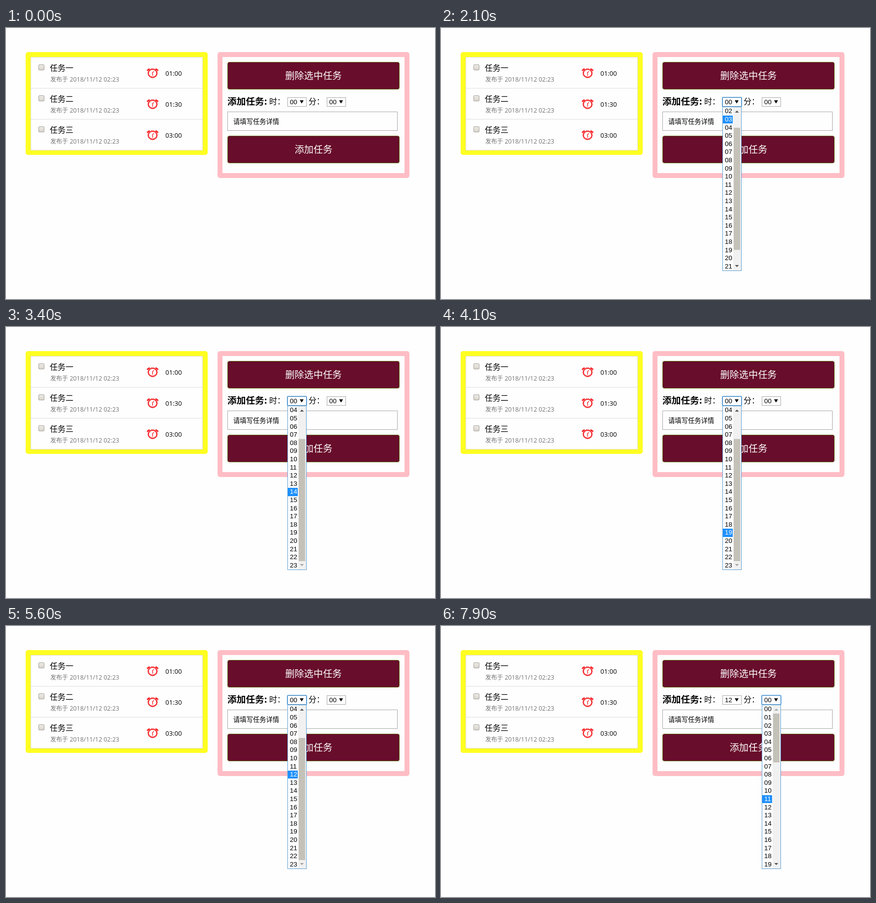
An HTML page that plays this animation: 872x551 px, repeating every 8 s.

```html
<!DOCTYPE html>
<html lang="zh-CN">
<head>
<meta charset="utf-8">
<title>任务列表</title>
<style>
html, body { margin: 0; width: 100%; height: 100%; overflow: hidden; background: #fefefe; }
svg { display: block; width: 872px; height: 551px; }
text { font-family: "Noto Sans CJK SC", "Noto Sans CJK", sans-serif; white-space: pre; }
.num { font-family: "Open Sans", "Noto Sans", sans-serif; }
.opt { font-family: "Liberation Sans", Arial, sans-serif; }
</style>
</head>
<body>
<svg viewBox="0 0 872 551" xmlns="http://www.w3.org/2000/svg">
  <defs>
    <linearGradient id="box" x2="0" y2="1">
      <stop stop-color="#eeebe6"/><stop offset="1" stop-color="#d8d4cc"/>
    </linearGradient>
  </defs>
  <g id="page"></g>
  <g id="live"></g>
</svg>
<script>
const LOOP = 8000, ROWS = 20, ROW_H = 16.6, TOP = 161;
const page = document.getElementById('page'), live = document.getElementById('live');

const rect = (x, y, w, h, fill, more = '') =>
  `<rect x="${x}" y="${y}" width="${w}" height="${h}" fill="${fill}" ${more}/>`;
const text = (x, y, size, str, more = '') =>
  `<text x="${x}" y="${y}" font-size="${size}" ${more}>${str}</text>`;
const path = (d, more = '') => `<path d="${d}" ${more}/>`;

const panel = (x, y, w, h, color) =>
  rect(x, y, w, h, color, 'rx="5"') + rect(x + 10, y + 10, w - 20, h - 20, '#fefefe');

const button = (y, label) =>
  rect(450.5, y + .5, 349, 55, '#680d2b', 'rx="3.5" stroke="#66751c"') +
  text(625, y + 35, 19.2, label, 'fill="#fff" text-anchor="middle"');

const clock = (x, y) => `<g transform="translate(${x} ${y})" fill="none" stroke="#f5262a">
  <ellipse rx="8.6" ry="8.2" stroke-width="2.2"/>
  <circle r="9.9" stroke-width=".8" stroke-dasharray="2 1.6"/>
  <path d="M-10.5-6L-7-8.5M10.5-6L7-8.5" stroke-width="2.8" stroke-linecap="round"/>
  <path d="M0 5V0M-1 0L2.5-4" stroke-width="1.4"/></g>`;

const task = ([name, time], i) => {
  const y = 59 + 63 * i;
  return rect(66.5, y + 15.5, 11, 11, 'url(#box)', 'rx="1.5" stroke="#a5a29c"') +
    text(89, y + 28, 16, name) +
    text(90, y + 49.5, 12, '发布于', 'fill="#757575"') +
    text(129.5, y + 49.5, 12.4, '2018/11/12 02:23', 'class="num" fill="#757575"') +
    clock(298, y + 33) +
    text(324, y + 38, 13.1, time, 'class="num"') +
    path(`M50 ${y + 63.5}H400`, 'stroke="#ddd"');
};

page.innerHTML =
  panel(40, 49, 370, 209, '#ffff22') +
  rect(50.5, 59.5, 349, 189, '#fefefe', 'stroke="#ddd"') +
  [['任务一', '01:00'], ['任务二', '01:30'], ['任务三', '03:00']].map(task).join('') +
  panel(430, 49, 390, 256, '#ffbdc5') +
  button(69, '删除选中任务') +
  text(450, 155.5, 18.72, '添加任务:', 'font-weight="bold"') +
  text(535, 155, 16, '时：') + text(615, 155, 16, '分：') +
  rect(450.5, 170.5, 345, 38, '#fefefe', 'stroke="#a9a9a9"') +
  text(462, 195, 13.33, '请填写任务详情') +
  button(219, '添加任务');

const two = n => String(n).padStart(2, '0');

function select(x, value, focus, hover) {
  return rect(x + .5, 141.5, 38, 18, '#fefefe', `stroke="${hover ? '#7a7a7a' : '#a9a9a9'}"`) +
    text(x + 5, 155, 13.33, two(value), 'class="opt"') +
    path(`M${x + 25} 147h8l-4 6.5z`) +
    (focus ? rect(x, 141, 39, 19, 'none', 'rx="1.5" stroke="#4a98dc" stroke-width="1.7"') : '');
}

function popup(x, count, pick, scroll, hot) {
  let out = rect(x + .5, 160.5, 38, 333, '#fefefe', 'stroke="#5a9fd4"');
  for (let i = 0; i < ROWS; i++) {
    const n = i + scroll, y = Math.round(TOP + i * ROW_H), on = n === pick;
    if (on) out += rect(x + 1, y, 20, Math.round(TOP + (i + 1) * ROW_H) - y, '#1e90ff');
    out += text(x + 5, Math.round(173.3 + i * ROW_H), 13.33, two(n), `class="opt" fill="${on ? '#fff' : '#000'}"`);
  }
  const arrow = ok => `fill="${ok ? '#505050' : '#a3a3a3'}"`;
  return out + rect(x + 22, 161, 16, 332, '#f1f1f1') +
    rect(x + 23, 178 + 298 * scroll / count, 13, 298 * ROWS / count, hot ? '#a8a8a8' : '#c4c1b9') +
    path(`M${x + 25.5} 172l4-4 4 4z`, arrow(scroll > 0)) +
    path(`M${x + 25.5} 482l4 4 4-4z`, arrow(scroll < count - ROWS));
}

// Each entry changes part of the state from its time on.
const events = [
  [0, { hour: 0, focus: '', open: '', hover: '', pick: 0, scroll: 0, hot: false }],
  [500, { hover: 'h' }],
  [1100, { focus: 'h', open: 'h' }],
  [1500, { pick: 1 }], [1600, { pick: 3 }],
  [2100, { scroll: 2 }], [2200, { scroll: 4 }],
  [2700, { pick: 7 }], [2800, { pick: 8 }],
  ...[9, 10, 11, 13, 14, 15, 16].map((pick, i) => [3000 + 100 * i, { pick }]),
  [3800, { pick: 17 }], [4000, { pick: 18 }], [4100, { pick: 19 }],
  ...[20, 21, 22].map((pick, i) => [4300 + 100 * i, { pick }]),
  ...[21, 19, 17, 16, 14, 13].map((pick, i) => [4800 + 100 * i, { pick, hot: i === 2 || i === 3 }]),
  [5600, { pick: 12 }],
  [6100, { hour: 12, open: '', hover: '' }],
  [6900, { hover: 'm' }],
  [7300, { focus: 'm', open: 'm', pick: 0, scroll: 0 }],
  [7600, { pick: 1, hover: '' }],
  [7800, { pick: 5 }], [7900, { pick: 11 }]
];

let shown = 0;
function draw() {
  const t = performance.now() % LOOP;
  const past = events.filter(e => e[0] <= t);
  if (past.length !== shown) {
    shown = past.length;
    const s = Object.assign({}, ...past.map(e => e[1]));
    const forHour = s.open === 'h';
    live.innerHTML =
      select(572, s.hour, s.focus === 'h', s.hover === 'h') +
      select(652, 0, s.focus === 'm', s.hover === 'm') +
      (s.open ? popup(forHour ? 572 : 652, forHour ? 24 : 60, s.pick, s.scroll, s.hot) : '');
  }
  requestAnimationFrame(draw);
}
draw();
</script>
</body>
</html>
```
